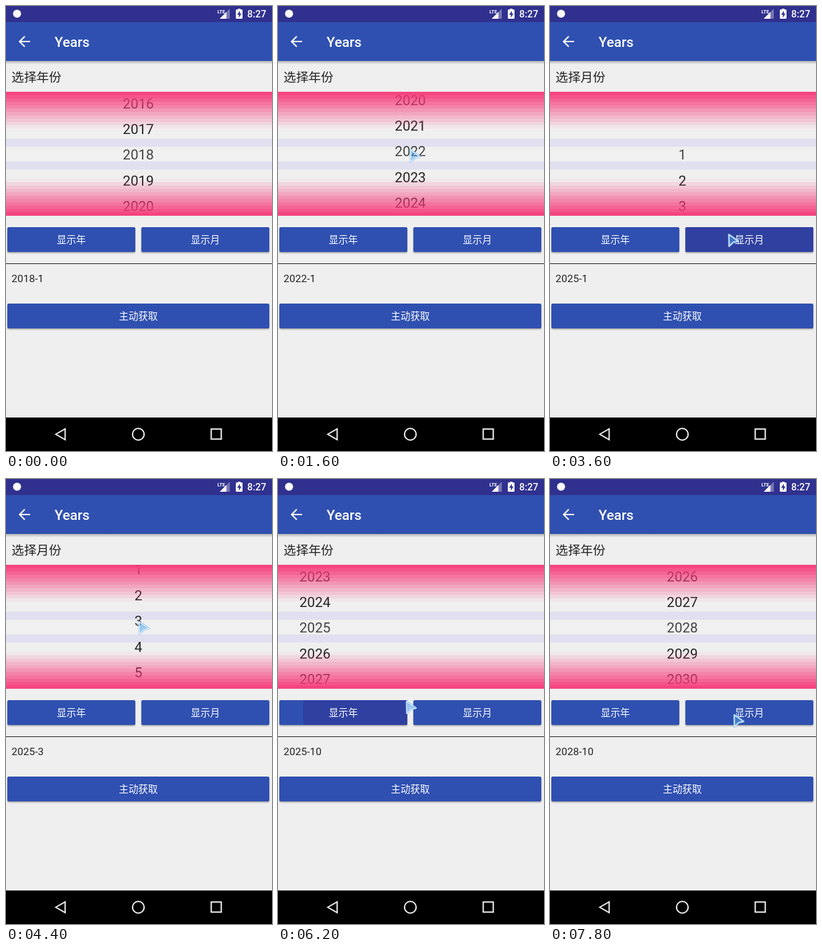
These frames come from a looping animation (397 by 664 pixels, 8000 ms). An HTML page with a canvas:

```html
<!DOCTYPE html>
<html lang="zh">
<head>
<meta charset="utf-8">
<title>Years</title>
<style>
  html, body { margin: 0; width: 100%; height: 100%; overflow: hidden; background: #efefef; }
  canvas { display: block; width: 397px; height: 664px; }
</style>
</head>
<body>
<canvas id="stage"></canvas>
<script>
const W = 397, H = 664, LOOP = 8000, STEP = 200;
const DP = W / 384;
const CJK = '"Noto Sans CJK SC", "Noto Sans CJK", sans-serif';
const LATIN = 'Roboto, sans-serif';
const WHEEL = { top: 128, bottom: 313, mid: 222, pitch: 38.4, stripes: 11 };
const BLUE = '#2f50b0';

const canvas = document.getElementById('stage');
const ctx = canvas.getContext('2d');
const ratio = window.devicePixelRatio || 1;
canvas.width = W * ratio;
canvas.height = H * ratio;

const between = (t, from, to) => t >= from && t < to;

// Share of the span from..to that has passed.
const part = (t, from, to) => Math.min(1, Math.max(0, (t - from) / (to - from)));
const ease = p => p * p * (3 - 2 * p);

function yearAt(t) {
  return 2018 + 4.13 * part(t, 400, 1600) + 2.23 * part(t, 1600, 2400)
    + 0.64 * part(t, 2400, 2800) + 3 * ease(part(t, 6600, 7600));
}

function monthAt(t) {
  return 1 + 6.79 * part(t, 4000, 5200) + 2.21 * part(t, 5200, 5800);
}

// Stops of the pointer; it eases from each one to the next.
const stops = [
  { at: 200, x: 320, y: 330 }, { at: 600, x: 198, y: 225 },
  { at: 1600, x: 196, y: 213 }, { at: 2400, x: 192, y: 177 },
  { at: 3600, x: 265, y: 339 }, { at: 4200, x: 198, y: 215 },
  { at: 5200, x: 189, y: 179 }, { at: 6200, x: 190, y: 330 },
  { at: 6400, x: 190, y: 330 }, { at: 7000, x: 194, y: 190 },
  { at: 7600, x: 275, y: 362 }, { at: 7800, x: 273, y: 350 }
];

function pointerAt(t) {
  const i = Math.max(1, stops.findIndex(s => s.at >= t));
  const a = stops[i - 1], b = stops[i];
  const p = ease(part(t, a.at, b.at));
  const dragging = between(t, 600, 2400) || between(t, 4200, 5200);
  const stroke = dragging ? 28 * Math.sin(Math.PI * t / 400) : 0;
  return { x: a.x + (b.x - a.x) * p, y: a.y + (b.y - a.y) * p + stroke };
}

function rect(x, y, w, h, color) {
  ctx.fillStyle = color;
  ctx.fillRect(x, y, w, h);
}

function label(str, x, y, sp, color, { font = LATIN, weight = 400, align = 'left' } = {}) {
  ctx.font = `${weight} ${sp * DP}px ${font}`;
  ctx.textAlign = align;
  ctx.fillStyle = color;
  ctx.fillText(str, x, y);
}

function poly(points, close = true) {
  ctx.beginPath();
  points.forEach(([x, y]) => ctx.lineTo(x, y));
  if (close) ctx.closePath();
}

function fillPoly(points, color) {
  poly(points);
  ctx.fillStyle = color;
  ctx.fill();
}

function stroke(color, width) {
  ctx.strokeStyle = color;
  ctx.lineWidth = width;
  ctx.stroke();
}

function statusBar() {
  rect(0, 0, W, 24, '#30308f');
  ctx.beginPath();
  ctx.arc(16.5, 11.5, 6, 0, Math.PI * 2);
  ctx.fillStyle = '#fff';
  ctx.fill();

  label('LTE', 315.5, 11, 6.8, '#fff', { weight: 700 });
  fillPoly([[319, 19], [334, 19], [334, 4]], 'rgba(255,255,255,.35)');
  fillPoly([[319, 19], [329, 19], [329, 9]], '#fff');

  rect(346, 4, 4, 2, '#fff');
  ctx.beginPath();
  ctx.roundRect(343, 5.3, 10, 13.7, 1);
  ctx.fill();
  fillPoly([[349, 7], [345, 13], [347.5, 13], [347.5, 17.5], [351.5, 11.3], [349, 11.3]], '#30308f');
  label('8:27', 388.5, 17, 14, '#fff', { weight: 500, align: 'right' });
}

function toolbar() {
  const shade = ctx.createLinearGradient(0, 82, 0, 87);
  shade.addColorStop(0, 'rgba(0,0,0,.26)');
  shade.addColorStop(1, 'rgba(0,0,0,0)');
  rect(0, 82, W, 5, shade);
  rect(0, 24, W, 58, BLUE);
  poly([[36, 53], [20.5, 53]], false);
  stroke('#fff', 2);
  poly([[28, 45.3], [20.3, 53], [28, 60.7]], false);
  stroke('#fff', 2);
  label('Years', 72.5, 61, 20, '#fff', { weight: 500 });
}

function wheel(pos, min, max, cx) {
  const { top, bottom, mid, pitch, stripes } = WHEEL;
  ctx.save();
  ctx.beginPath();
  ctx.rect(0, top, W, bottom - top);
  ctx.clip();
  rect(0, 198, W, 12, '#e0e0f0');
  rect(0, 232, W, 12, '#e0e0f0');
  const near = Math.round(pos);
  for (let v = Math.max(min, near - 3); v <= Math.min(max, near + 3); v++) {
    label(v, cx, mid + 7.4 + (v - pos) * pitch, 20, '#222', { align: 'center' });
  }
  rect(0, 210, W, 22, 'rgba(239,239,239,.16)');
  for (let i = 0; i < stripes; i++) {
    const color = `rgba(246,60,122,${1 - (i + 0.5) / stripes})`;
    rect(0, top + i * 5, W, 5, color);
    rect(0, bottom - (i + 1) * 5, W, 5, color);
  }
  ctx.restore();
}

function button(x, y, w, text, ripple) {
  ctx.save();
  ctx.shadowColor = 'rgba(0,0,0,.35)';
  ctx.shadowBlur = 2 * ratio;
  ctx.shadowOffsetY = 1.5 * ratio;
  ctx.beginPath();
  ctx.roundRect(x, y, w, 37, 2);
  ctx.fillStyle = BLUE;
  ctx.fill();
  ctx.restore();
  if (ripple) {
    ctx.save();
    ctx.clip();
    ctx.beginPath();
    ctx.arc(ripple.x, ripple.y, 160, 0, Math.PI * 2);
    ctx.fillStyle = '#3040a0';
    ctx.fill();
    ctx.restore();
  }
  label(text, x + w / 2, y + 24.3, 14, '#fff', { font: CJK, align: 'center' });
}

function navBar() {
  rect(0, 614, W, 50, '#000');
  poly([[74.3, 639], [88.3, 631], [88.3, 647]]);
  stroke('#eee', 2);
  ctx.beginPath();
  ctx.arc(197.5, 639, 8.7, 0, Math.PI * 2);
  stroke('#eee', 2);
  ctx.beginPath();
  ctx.rect(306.3, 631.3, 15, 15);
  stroke('#eee', 2);
}

function pointer({ x, y }) {
  ctx.save();
  ctx.translate(x, y);
  ctx.lineJoin = 'round';
  poly([[2, 2], [16, 11.8], [8.5, 13.6], [2.3, 19.5]]);
  const fill = ctx.createLinearGradient(2, 3, 12, 16);
  fill.addColorStop(0, 'rgba(50,140,220,.5)');
  fill.addColorStop(1, 'rgba(110,190,245,.5)');
  ctx.fillStyle = fill;
  ctx.fill();
  stroke('rgba(120,180,235,.7)', 3);
  stroke('#e4f3ff', 1.3);
  ctx.restore();
}

function draw(t) {
  const year = yearAt(t), month = monthAt(t), mouse = pointerAt(t);
  const monthly = between(t, 3600, 6200);
  const yearClick = between(t, 6200, 6600);
  const monthClick = between(t, 3600, 3800);

  ctx.setTransform(ratio, 0, 0, ratio, 0, 0);
  rect(0, 0, W, H, '#efefef');
  statusBar();
  toolbar();
  label(monthly ? '选择月份' : '选择年份', 8.3, 112.5, 18, '#222', { font: CJK });

  if (monthly) wheel(month, 1, 12, 197.5);
  else wheel(year, 1900, 2100, yearClick ? 55.2 : 197.5);

  button(2, 330, 191, '显示年', yearClick && { x: 197, y: 347 });
  button(202, 330, 191, '显示月', monthClick && mouse);
  rect(0, 384, W, 1, '#222');
  label(`${Math.round(year)}-${Math.round(month)}`, 8.3, 412, 15, '#222');
  button(2, 444, 391, '主动获取');
  navBar();
  if (t >= stops[0].at) pointer(mouse);
}

function frame() {
  const t = performance.now() % LOOP;
  draw(Math.floor(t / STEP) * STEP);
  requestAnimationFrame(frame);
}
frame();
</script>
</body>
</html>
```
